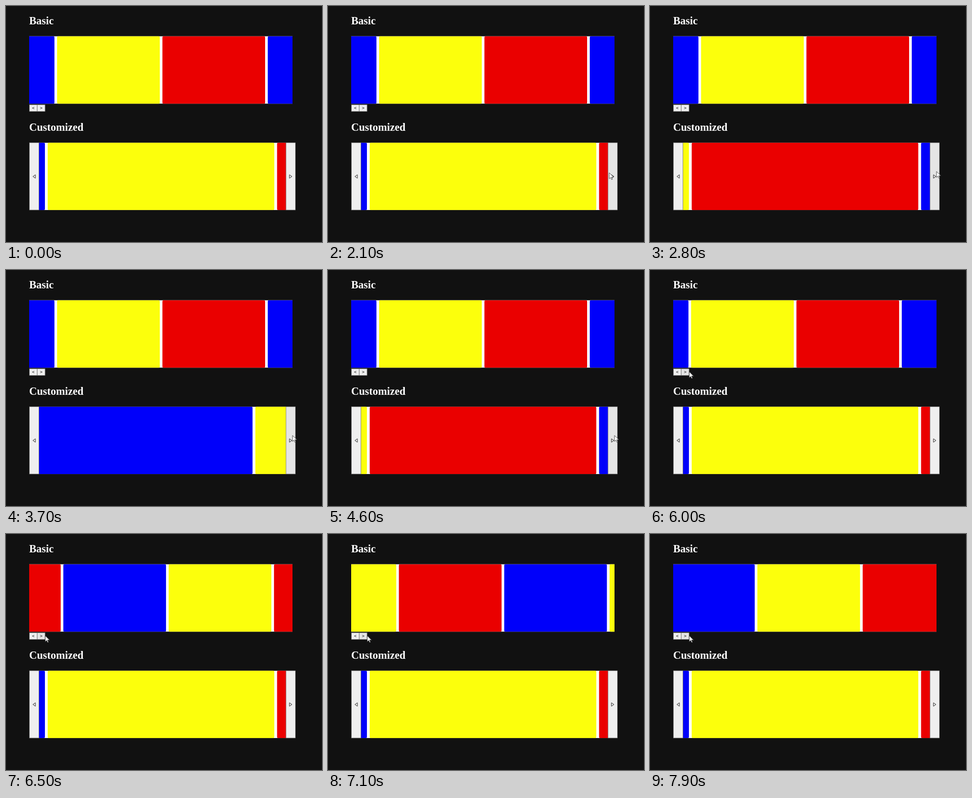
Animation of 600x450 px, one loop 8 s. Source, as an HTML page:

```html
<!DOCTYPE html>
<html lang="en">
<head>
<meta charset="utf-8">
<title>Carousels</title>
<style>
  html, body { margin: 0; width: 100%; height: 100%; overflow: hidden; background: #111; }
  svg { display: block; width: 100vw; height: 100vh; }
  .title { font: bold 20.4px "Liberation Serif", serif; fill: #fff; }
  .sign { font: bold 8px "Liberation Sans", sans-serif; fill: #333; text-anchor: middle; }
  .btn { fill: #efefef; stroke: #777; stroke-width: .7; }
  .btn.hover { fill: #e5e5e5; }
  .tri { fill: none; stroke: #222; stroke-width: .9; }
</style>
</head>
<body>
<svg viewBox="0 0 600 450">
  <rect width="600" height="450" fill="#111"/>
  <text class="title" x="44" y="35.3">Basic</text>
  <text class="title" x="44" y="238">Customized</text>
  <g id="carousels"></g>
  <rect class="btn" x="44.5" y="188.2" width="14.6" height="12.8"/>
  <rect class="btn" id="basicNext" x="59.3" y="188.2" width="14.8" height="12.8"/>
  <text class="sign" x="51.8" y="197.4">&lt;</text>
  <text class="sign" x="66.8" y="197.4">&gt;</text>
  <rect class="btn" x="44.5" y="260.8" width="18" height="128.2"/>
  <rect class="btn" id="customNext" x="531.8" y="260.8" width="17.8" height="128.2"/>
  <path class="tri" d="M55.8 321.8v6.6l-4.8-3.3z"/>
  <path class="tri" d="M538.2 321.8v6.6l4.8-3.3z"/>
  <path id="cursor" d="M0 0V11.4L2.7 8.9L4.5 13L6.2 12.2L4.4 8.2H8.2Z"
    fill="#fff" stroke="#333" stroke-width=".8" stroke-linejoin="round"/>
</svg>
<script>
const LOOP = 8000, TICK = 100, SLIDE_MS = 300;
const COLORS = ['#fcff0c', '#ea0000', '#0000fa'];
const $ = id => document.getElementById(id);

function make(tag, attrs, parent) {
  const el = document.createElementNS('http://www.w3.org/2000/svg', tag);
  for (const k in attrs) el.setAttribute(k, attrs[k]);
  return parent.appendChild(el);
}

// The CSS "ease" curve: cubic-bezier(.25, .1, .25, 1)
function ease(x) {
  if (x <= 0) return 0;
  if (x >= 1) return 1;
  const bez = (a, b, s) => 3 * a * s * (1 - s) ** 2 + 3 * b * s * s * (1 - s) + s ** 3;
  let lo = 0, hi = 1;
  for (let i = 0; i < 24; i++) {
    const mid = (lo + hi) / 2;
    if (bez(.25, .25, mid) < x) lo = mid; else hi = mid;
  }
  return bez(.1, 1, lo);
}

function carousel({ x, y, w, h, first, slide, pitch, clicks }) {
  const view = make('svg', { x, y, width: w, height: h, overflow: 'hidden' }, $('carousels'));
  make('rect', { width: w, height: h, fill: '#fff' }, view);
  const slides = [-1, 0, 1, 2, 3].map(() =>
    make('rect', { width: slide, height: h, rx: 2.5 }, view));
  return t => {
    const pos = clicks.reduce((sum, c) => sum + ease((t - c) / SLIDE_MS), 0);
    const base = Math.floor(pos) - 1;
    slides.forEach((el, i) => {
      const n = base + i;
      el.setAttribute('x', first - x + (n - pos) * pitch);
      el.setAttribute('fill', COLORS[(n + 3) % 3]);
    });
  };
}

const carousels = [
  carousel({
    x: 44, y: 57.4, w: 500, h: 129, first: 97, slide: 195, pitch: 200,
    clicks: [5970, 6290, 6620, 6947, 7380, 7817]
  }),
  carousel({
    x: 62.5, y: 260.6, w: 469.3, h: 128.6, first: 79.2, slide: 430.2, pitch: 435.5,
    clicks: [2400, 2920, 3670, 4130, 4620, 4950]
  })
];

// Pointer stops: time, x, y
const STOPS = [
  [800, 564, 429], [1000, 353, 429], [1300, 353, 429], [2100, 534, 318],
  [2300, 544, 315.5], [5150, 544, 315.5], [5750, 74.5, 194]
];

function pointer(t) {
  if (t < STOPS[0][0]) return null;
  const i = STOPS.findIndex(s => s[0] > t);
  if (i < 0) return STOPS[STOPS.length - 1].slice(1);
  const [t0, x0, y0] = STOPS[i - 1], [t1, x1, y1] = STOPS[i];
  const k = (t - t0) / (t1 - t0), e = k * k * (3 - 2 * k);
  return [x0 + (x1 - x0) * e, y0 + (y1 - y0) * e];
}

function draw(t) {
  carousels.forEach(update => update(t));
  const p = pointer(t);
  $('cursor').style.display = p ? '' : 'none';
  if (p) $('cursor').setAttribute('transform', `translate(${p})`);
  const over = (x0, y0, x1, y1) =>
    !!p && p[0] >= x0 && p[0] <= x1 && p[1] >= y0 && p[1] <= y1;
  $('basicNext').classList.toggle('hover', over(59, 188, 75, 201));
  $('customNext').classList.toggle('hover', over(532, 260, 550, 389));
}

const start = performance.now();
function frame() {
  const t = (performance.now() - start) % LOOP;
  draw(Math.floor(t / TICK) * TICK);
  requestAnimationFrame(frame);
}
frame();
</script>
</body>
</html>
```
